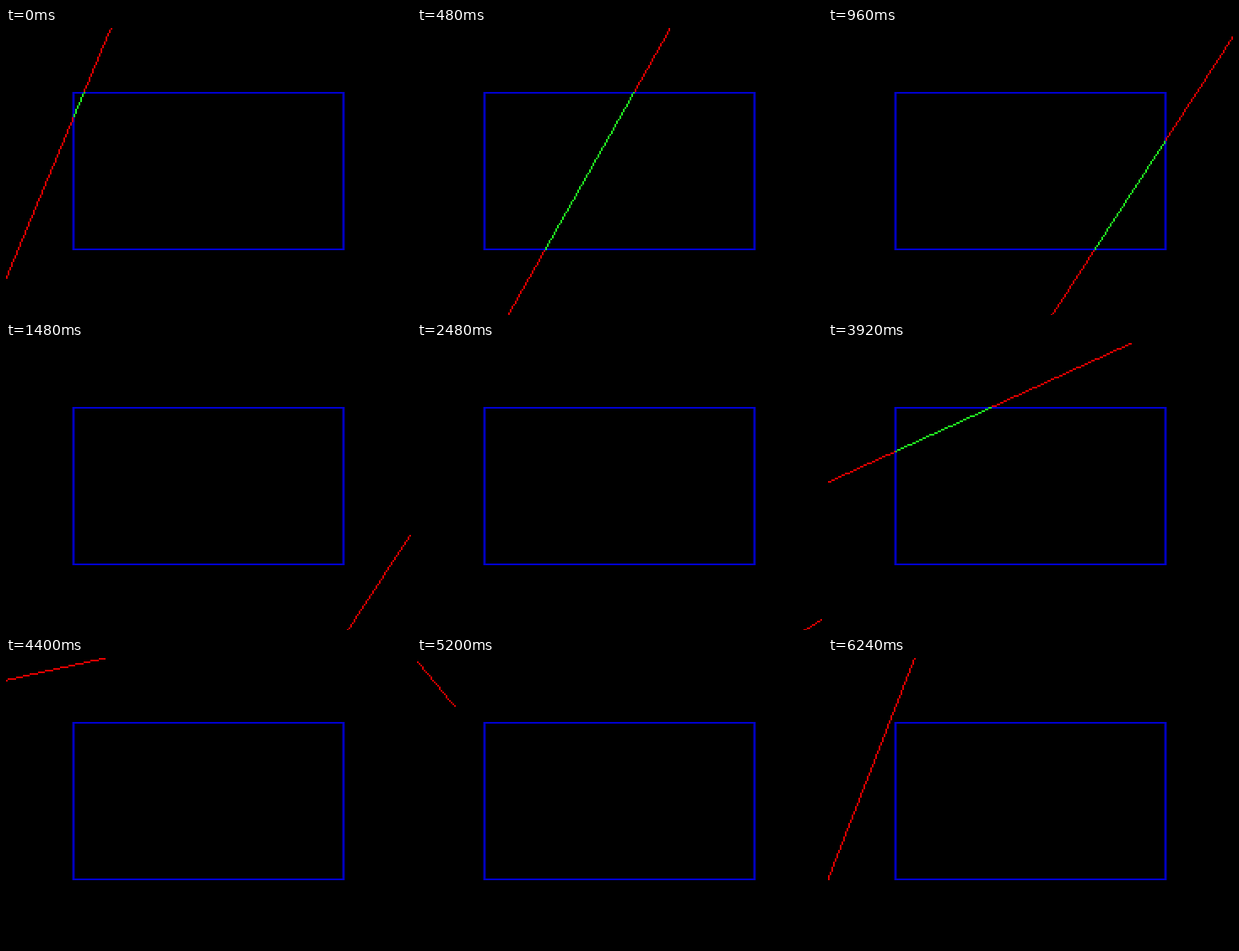
These frames come from a looping animation (480 px wide and 341 px high, 6.28 s). An HTML page with a canvas:

```html
<!DOCTYPE html>
<html lang="en">
<head>
<meta charset="utf-8">
<title>Line clipping</title>
<style>
  html, body { margin: 0; height: 100%; overflow: hidden; background: #000; }
  canvas { display: block; width: 100vw; height: 100vh; }
</style>
</head>
<body>
<canvas id="stage" width="480" height="341"></canvas>
<script>
const ctx = document.getElementById("stage").getContext("2d");
const LOOP = 6280, STEP = 40, CELL = 2;
const box = { left: 80, top: 77, right: 400, bottom: 263 };

// The two ends of the segment orbit in opposite directions.
function endpoints(angle) {
  const c = Math.cos(angle), s = Math.sin(angle);
  return [
    { x: 239.5 - 252.5 * c + 91.5 * s, y: 237 + 91 * c + 247 * s },
    { x: 116 + 130 * c + 382 * s, y: 90 - 382 * c + 130 * s }
  ];
}

function isInside(x, y) {
  return x >= box.left && x <= box.right && y >= box.top && y <= box.bottom;
}

function drawBox() {
  const { left, top, right, bottom } = box;
  // The upright sides have a soft edge around a two-pixel core.
  for (const x of [left, right]) {
    ctx.fillStyle = "#000050";
    ctx.fillRect(x - 2, top - 1, 4, bottom - top + 2);
    ctx.fillStyle = "#0000c0";
    ctx.fillRect(x - 1, top - 1, 2, bottom - top + 2);
  }
  ctx.fillStyle = "#0000d0";
  for (const y of [top, bottom]) ctx.fillRect(left - 1, y - 1, right - left + 2, 2);
}

// Stepped line on a coarse grid, coloured by its position relative to the box.
function drawLine(a, b) {
  const dx = (b.x - a.x) / CELL, dy = (b.y - a.y) / CELL;
  const count = Math.max(1, Math.round(Math.max(Math.abs(dx), Math.abs(dy))));
  for (let i = 0; i <= count; i++) {
    const x = Math.floor(a.x / CELL + dx * i / count) * CELL;
    const y = Math.floor(a.y / CELL + dy * i / count) * CELL;
    ctx.fillStyle = isInside(x + CELL / 2, y + CELL / 2) ? "#22f822" : "#e00000";
    ctx.fillRect(x, y, CELL, CELL);
  }
}

function render(now) {
  const time = Math.floor((now % LOOP) / STEP) * STEP;
  ctx.fillStyle = "#000";
  ctx.fillRect(0, 0, 480, 341);
  drawBox();
  drawLine(...endpoints(0.996 * time / 1000));
}

const start = performance.now();
function tick() {
  render(performance.now() - start);
  requestAnimationFrame(tick);
}
tick();
</script>
</body>
</html>
```
